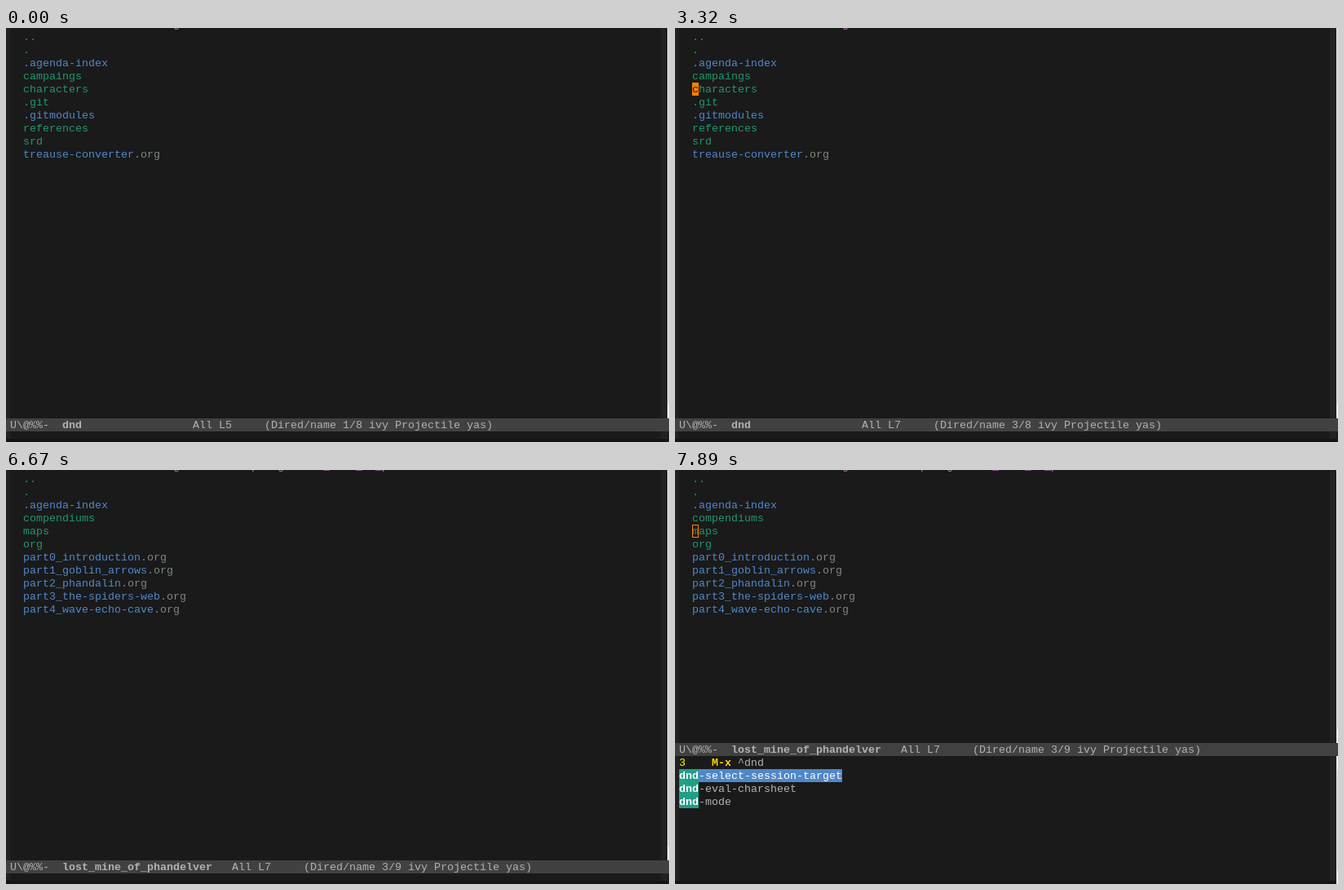
Recreate the animation shown at these times as an HTML page. Size 813 px wide and 508 px high, loop 8000 ms.

```html
<!DOCTYPE html>
<html lang="en">
<head>
<meta charset="utf-8">
<title>Dired session</title>
<style>
  html, body { margin: 0; width: 100%; height: 100%; overflow: hidden; background: #1a1a1a; }
  svg { display: block; width: 813px; height: 508px; }
  text { font: 13.333px "Liberation Mono", "Courier New", monospace; white-space: pre; }
  .b { font-weight: bold; }
</style>
</head>
<body>
<svg id="stage" viewBox="0 0 813 508"></svg>
<script>
const LOOP = 8000, W = 813, H = 508, CW = 8, LH = 16;
const C = {
  bg: '#1a1a1a', fringe: '#222222', bar: '#414141', fg: '#b2b2b2', dir: '#22976f',
  file: '#5088cc', ext: '#7d8880', head: '#bc6ec5', cursor: '#ff8000',
  count: '#ffff00', prompt: '#ffd700', sel: '#4f87c8', match: '#1f9f87', hot: '#ffffff'
};

// A trailing slash marks a directory.
const DIRS = [
  { name: 'dnd', items: ['.agenda-index', 'campaings/', 'characters/', '.git/',
    '.gitmodules', 'references/', 'srd/', 'treause-converter.org'] },
  { name: 'campaings', items: ['lost_mine_of_phandelver/'] },
  { name: 'lost_mine_of_phandelver', items: ['.agenda-index', 'compendiums/', 'maps/', 'org/',
    'part0_introduction.org', 'part1_goblin_arrows.org', 'part2_phandalin.org',
    'part3_the-spiders-web.org', 'part4_wave-echo-cave.org'] }
];

// Commands offered for each typed prefix.
const DND = { count: 3, list: ['dnd-select-session-target', 'dnd-eval-charsheet', 'dnd-mode'] };
const MATCHES = {
  '': { count: 8448, list: ['eww-buffer-select', 'enable-theme',
    'dap-ui-breakpoint-log-message', 'rng-what-schema', 'vc-git-stash-snapshot',
    'magit-submodule-update', 'counsel-compile-env', 'url-setup-privacy-info',
    'flycheck-next-error'] },
  d: { count: 512, list: ['dap-ui-breakpoint-log-message', 'dired-do-copy',
    'describe-theme', 'dap-ui-expressions-refresh-on-select', 'display-time-world',
    'dired-hide-details-mode', 'delete-other-windows', 'dap-debug-restart',
    'dired-toggle-marks'] },
  dn: DND,
  dnd: DND
};

// Keys pressed: v down, ^ up, > open, : command prompt, letters typed into it.
const KEYS = 'vvvv^^^>>vv:dnd';
const TIMES = [1970, 2090, 2520, 2790, 3170, 3320, 3720, 3970, 4700, 5930, 6080, 6790, 7060, 7210, 7330];
// The cursor stays solid after a key, then blinks.
const SOLID = 550, OFF = 550, ON = 430;

function stateAt(t) {
  const s = { depth: 0, row: 0, typed: null };
  let last = 280 - SOLID - OFF;
  TIMES.filter(at => at <= t).forEach((at, i) => {
    const key = KEYS[i];
    last = at;
    if (key === 'v') s.row++;
    else if (key === '^') s.row--;
    else if (key === '>') { s.depth++; s.row = 0; }
    else if (key === ':') s.typed = '';
    else s.typed += key;
  });
  const idle = t - last - SOLID;
  s.lit = idle < 0 || idle % (OFF + ON) >= OFF;
  return s;
}

const rect = (x, y, w, h, fill) =>
  `<rect x="${x}" y="${y}" width="${w}" height="${h}" fill="${fill}"/>`;
const text = (x, top, str, fill, bold) =>
  `<text x="${x}" y="${top + 12}" fill="${fill}"${bold ? ' class="b"' : ''}>${str}</text>`;

const scrollbar = (top, bottom) =>
  rect(W - 2, top, 2, bottom - top, '#f0f0f0') +
  rect(W - 1, top + 17, 1, bottom - top - 34, '#cdcdcd');

function entry(item, top) {
  if (item.endsWith('/')) return text(21, top, item.slice(0, -1), C.dir);
  const dot = item.lastIndexOf('.');
  if (dot < 1) return text(21, top, item, C.file);
  return text(21, top, item.slice(0, dot), C.file) +
    text(21 + dot * CW, top, item.slice(dot), C.ext);
}

function modeline({ name, items }, row, top) {
  const x = 69 + Math.max(20, name.length + 3) * CW;
  return rect(0, top, W, LH, C.bar) +
    text(5, top, 'U\\@%%-', C.fg) + text(69, top, name, C.fg, true) +
    text(x, top, `All L${row + 5}`, C.fg) +
    text(x + 11 * CW, top, `(Dired/name ${row + 1}/${items.length} ivy Projectile yas)`, C.fg);
}

function minibuffer(typed, lit, top) {
  const { count, list } = MATCHES[typed], skip = typed.length * CW;
  let out = text(5, top, String(count), C.count) + text(45, top, 'M-x', C.prompt, true) +
    text(77, top, '^' + typed, C.fg);
  if (lit) out += rect(85 + skip, top, CW, LH, C.cursor);
  list.forEach((name, i) => {
    const y = top + (i + 1) * LH;
    if (i === 0) out += rect(5, y, name.length * CW, LH, C.sel);
    if (typed) out += rect(5, y, skip, LH, C.match) + text(5, y, typed, C.hot, true);
    out += text(5 + skip, y, name.slice(typed.length), i ? C.fg : C.hot);
  });
  return out;
}

function draw({ depth, row, typed, lit }) {
  const dir = DIRS[depth], open = typed !== null;
  const bar = open ? 335 : 479, cy = 35 + row * LH;
  const path = '/home/user/documents/org/me/' + DIRS.slice(0, depth + 1).map(d => d.name).join('/');
  let out = rect(0, 0, W, H, C.bg) + rect(0, 0, 5, H, C.fringe) +
    rect(803, 0, 8, H, C.fringe) + rect(0, 504, 811, 4, '#191215') + scrollbar(-17, bar);
  out += text(21, -13, path + ':', C.head) + text(21, 3, '..', C.dir) + text(21, 19, '.', C.dir);
  out += dir.items.map((item, i) => entry(item, 35 + i * LH)).join('');
  if (open) {
    out += `<rect x="21.5" y="${cy + 0.5}" width="7" height="15" fill="none" stroke="${C.cursor}"/>`;
    out += scrollbar(bar + LH, H + 1) + minibuffer(typed, lit, bar + LH);
  } else if (lit) {
    out += rect(21, cy, CW, LH, C.cursor) + text(21, cy, dir.items[row][0], C.bg);
  }
  return out + modeline(dir, row, bar);
}

const stage = document.getElementById('stage');
const start = performance.now();
let shown;
function tick() {
  const markup = draw(stateAt((performance.now() - start) % LOOP));
  if (markup !== shown) stage.innerHTML = shown = markup;
  requestAnimationFrame(tick);
}
tick();
</script>
</body>
</html>
```
